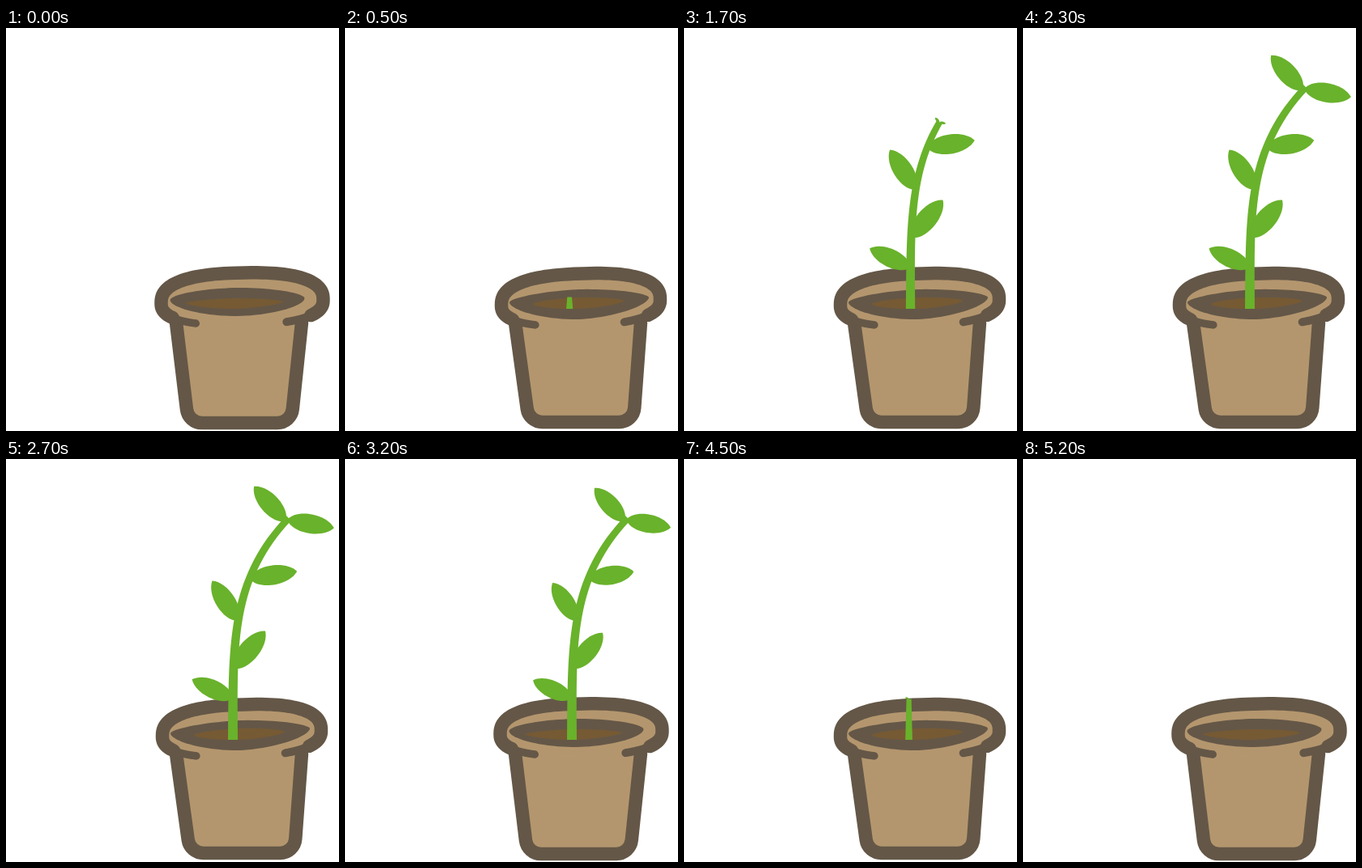
Animation of 411x498 px, one loop 5.3 s. Source, as an HTML page with a canvas:

```html
<!DOCTYPE html>
<html lang="en">
<head>
<meta charset="utf-8">
<title>Growing plant</title>
<style>
  html, body { margin: 0; width: 100%; height: 100%; overflow: hidden; background: #fff; }
  canvas { display: block; }
</style>
</head>
<body>
<canvas id="stage" width="411" height="498"></canvas>
<script>
const ctx = document.getElementById('stage').getContext('2d');
const DARK = '#645747', TAN = '#b4966e', SOIL = '#765a34', GREEN = '#69b22b';
const STEP = 100, COUNT = 53, TALL = 274, PI = Math.PI;

// Two drawings of the pot, swapped on every step
const pots = [
  {
    rim: { cx: 291.5, cy: 338, a: 100, up: 35.5, down: 29, n: 2.5, tilt: 2 },
    mouth: { cx: 285.5, cy: 335, a: 83, up: 14, down: 21, n: 1.8, tilt: 1 },
    soil: { cx: 282, cy: 339, a: 60, up: 5, down: 8, n: 1.6, tilt: 1 },
    left: 225, right: 352, floor: 488
  },
  {
    rim: { cx: 291, cy: 339, a: 98, up: 35.5, down: 29, n: 2.5, tilt: 3.5 },
    mouth: { cx: 289, cy: 336, a: 86, up: 13, down: 24, n: 1.7, tilt: 3 },
    soil: { cx: 288, cy: 339, a: 56, up: 6, down: 8, n: 1.7, tilt: 2 },
    left: 227, right: 356, floor: 487
  }
];

// Leaves: birth step, height on the stem, reach at full size
const leaves = [
  { born: 6.8, h: 51, dx: -49, dy: -23 },
  { born: 8.4, h: 88, dx: 38, dy: -45 },
  { born: 11.8, h: 147, dx: -31, dy: -48 },
  { born: 14.6, h: 199, dx: 57, dy: -9 },
  { born: 16.7, h: 270, dx: -38, dy: -42 },
  { born: 16.7, h: 272, dx: 56, dy: 10 }
];

const clamp = v => Math.min(1, Math.max(0, v));
const power = (v, p) => Math.sign(v) * Math.abs(v) ** p;

// Lopsided superellipse, whole or as an arc between two angles
function oval({ cx, cy, a, up, down, n, tilt }, from = 0, to = 2 * PI) {
  const path = new Path2D();
  for (let i = 0; i <= 80; i++) {
    const t = from + (to - from) * i / 80;
    const u = power(Math.cos(t), 2 / n), v = power(Math.sin(t), 2 / n);
    path.lineTo(cx + a * u, cy + (v < 0 ? up : down) * v - tilt * u);
  }
  return path;
}

function fill(path, color) {
  ctx.fillStyle = color;
  ctx.fill(path);
}

function stroke(path, width) {
  ctx.lineWidth = width;
  ctx.stroke(path);
}

function drawPot({ rim, mouth, soil, left, right, floor }) {
  const body = new Path2D();
  body.moveTo(210, 364);
  body.arcTo(left, floor, right, floor, 19);
  body.arcTo(right, floor, 365, 364, 19);
  body.lineTo(365, 364);
  ctx.strokeStyle = DARK;
  ctx.lineCap = 'round';
  fill(body, TAN);
  stroke(body, 16.5);
  fill(oval(rim), TAN);
  stroke(oval(rim, PI - .6, 2 * PI + .62), 16.5);
  stroke(oval(rim, PI - 1.05, PI - .5), 9.5);
  stroke(oval(rim, .5, 1.08), 10);
  fill(oval(mouth), DARK);
  fill(oval(soil), SOIL);
}

// The stem leans further right the higher it gets
function stemAt(h, grown) {
  return [277 + 3 * grown + 69 * (h / TALL) ** 3.8, 347 - h];
}

function drawStem(height, grown) {
  const path = new Path2D(), n = 40;
  const edge = (i, side) => {
    const h = height * i / n, [x, y] = stemAt(h, grown);
    const slope = 3.8 * 69 / TALL * (h / TALL) ** 2.8;
    const r = side * (8 + 4 * grown) * (1 - .3 * i / n) / 2 / Math.hypot(1, slope);
    path.lineTo(x + r, y + r * slope);
  };
  for (let i = 0; i <= n; i++) edge(i, -1);
  for (let i = n; i >= 0; i--) edge(i, 1);
  fill(path, GREEN);
}

function drawLeaf([x, y], dx, dy) {
  const path = new Path2D(), w = .27;
  const side = (s, t) => [x + dx * t - dy * w * s, y + dy * t + dx * w * s];
  path.moveTo(x, y);
  path.bezierCurveTo(...side(1, .15), ...side(1, .8), x + dx, y + dy);
  path.bezierCurveTo(...side(-1, .8), ...side(-1, .15), x, y);
  fill(path, GREEN);
}

function drawPlant(k) {
  const height = Math.min(TALL, 18 * (k - 4.2));
  if (height <= 0) return;
  const grown = height / TALL, wobble = k % 2 ? 1.03 : .98;
  drawStem(height, grown);
  for (const { born, h, dx, dy } of leaves) {
    const size = clamp((k - born) / 2.2) * wobble;
    if (size > 0) drawLeaf(stemAt(Math.min(h, height), grown), dx * size, dy * size);
  }
}

function draw(time) {
  const step = Math.floor(time / STEP) % COUNT;
  const k = Math.min(step, COUNT - 1 - step); // grows, then shrinks back
  ctx.fillStyle = '#fff';
  ctx.fillRect(0, 0, 411, 498);
  drawPot(pots[k % 2]);
  drawPlant(k);
  requestAnimationFrame(() => draw(performance.now() - start));
}

const start = performance.now();
draw(0);
</script>
</body>
</html>
```
